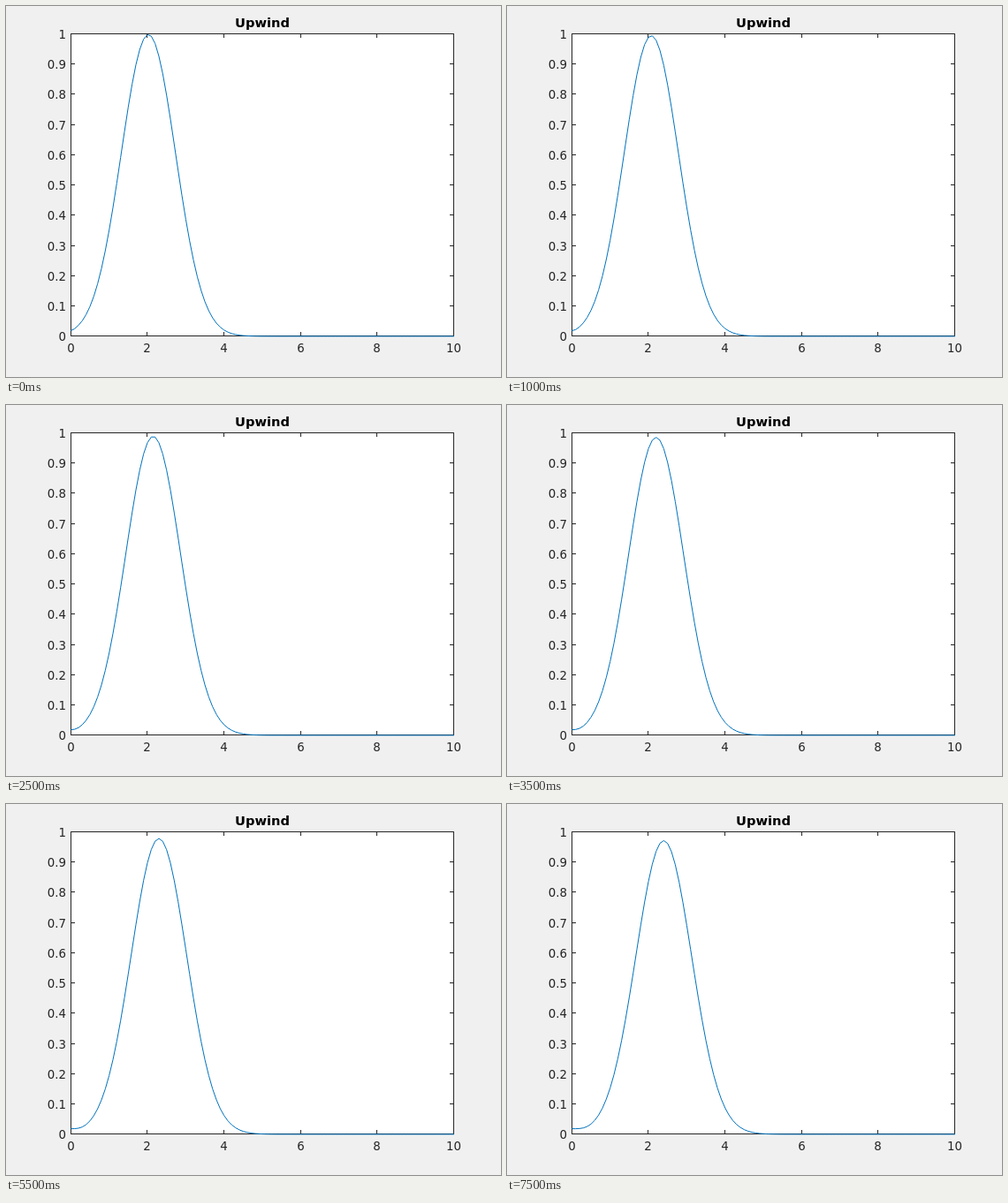
Animation, 560 px wide and 420 px high, one loop 8000 ms. Source, as an HTML page:

```html
<!DOCTYPE html>
<html>
<head>
<meta charset="utf-8">
<style>
  html, body { margin: 0; width: 100%; height: 100%; overflow: hidden; background: #f0f0f0; }
  svg { display: block; }
  text { font: 13.33px "DejaVu Sans", sans-serif; fill: #262626; }
  .title { font-size: 14.67px; font-weight: bold; fill: #000; }
  .mid { text-anchor: middle; }
  .end { text-anchor: end; }
</style>
</head>
<body>
<svg width="560" height="420" viewBox="0 0 560 420">
  <rect x="73.5" y="31.5" width="433" height="342" fill="#fff"/>
  <path id="axes" fill="none" stroke="#262626"/>
  <g id="labels"><text class="title mid" x="290" y="24">Upwind</text></g>
  <path id="curve" fill="none" stroke="#0072bd" stroke-linejoin="round"/>
</svg>
<script>
const $ = id => document.getElementById(id);
const LEFT = 73.5, RIGHT = 506.5, TOP = 31.5, BOTTOM = 373.5, TICK = 4.5;
const STEP_MS = 500, STEPS = 16;
const DX = 0.1, COURANT = 0.25;

function label(text, x, y, cls) {
  const el = document.createElementNS("http://www.w3.org/2000/svg", "text");
  el.textContent = text;
  el.setAttribute("x", x);
  el.setAttribute("y", y);
  el.setAttribute("class", cls);
  $("labels").append(el);
}

let axes = `M${LEFT} ${TOP}H${RIGHT}V${BOTTOM}H${LEFT}Z`;
for (let v = 0; v <= 10; v += 2) {
  const x = Math.floor(73 + v * 43.35) + 0.5;
  axes += `M${x} ${TOP}v${TICK}M${x} ${BOTTOM}v${-TICK}`;
  label(v, x, 392, "mid");
}
for (let i = 0; i <= 10; i++) {
  const y = Math.floor(373.8 - i * 34.23) + 0.5;
  axes += `M${LEFT} ${y}h${TICK}M${RIGHT} ${y}h${-TICK}`;
  label(i / 10, 68, y + 5, "end");
}
$("axes").setAttribute("d", axes);

// First-order upwind advection of a Gaussian, inflow value held fixed
let u = Array.from({ length: 101 }, (_, i) => Math.exp(-((i * DX - 2) ** 2)));
const paths = [];
for (let n = 0; n < STEPS; n++) {
  u = u.map((v, i) => i ? v - COURANT * (v - u[i - 1]) : v);
  paths.push("M" + u.map((v, i) =>
    `${(73.3 + i * DX * 43.36).toFixed(2)} ${(373.9 - v * 342.3).toFixed(2)}`).join("L"));
}

let shown = -1;
function draw() {
  const n = Math.floor(performance.now() / STEP_MS) % STEPS;
  if (n !== shown) $("curve").setAttribute("d", paths[shown = n]);
  requestAnimationFrame(draw);
}
draw();
</script>
</body>
</html>
```
